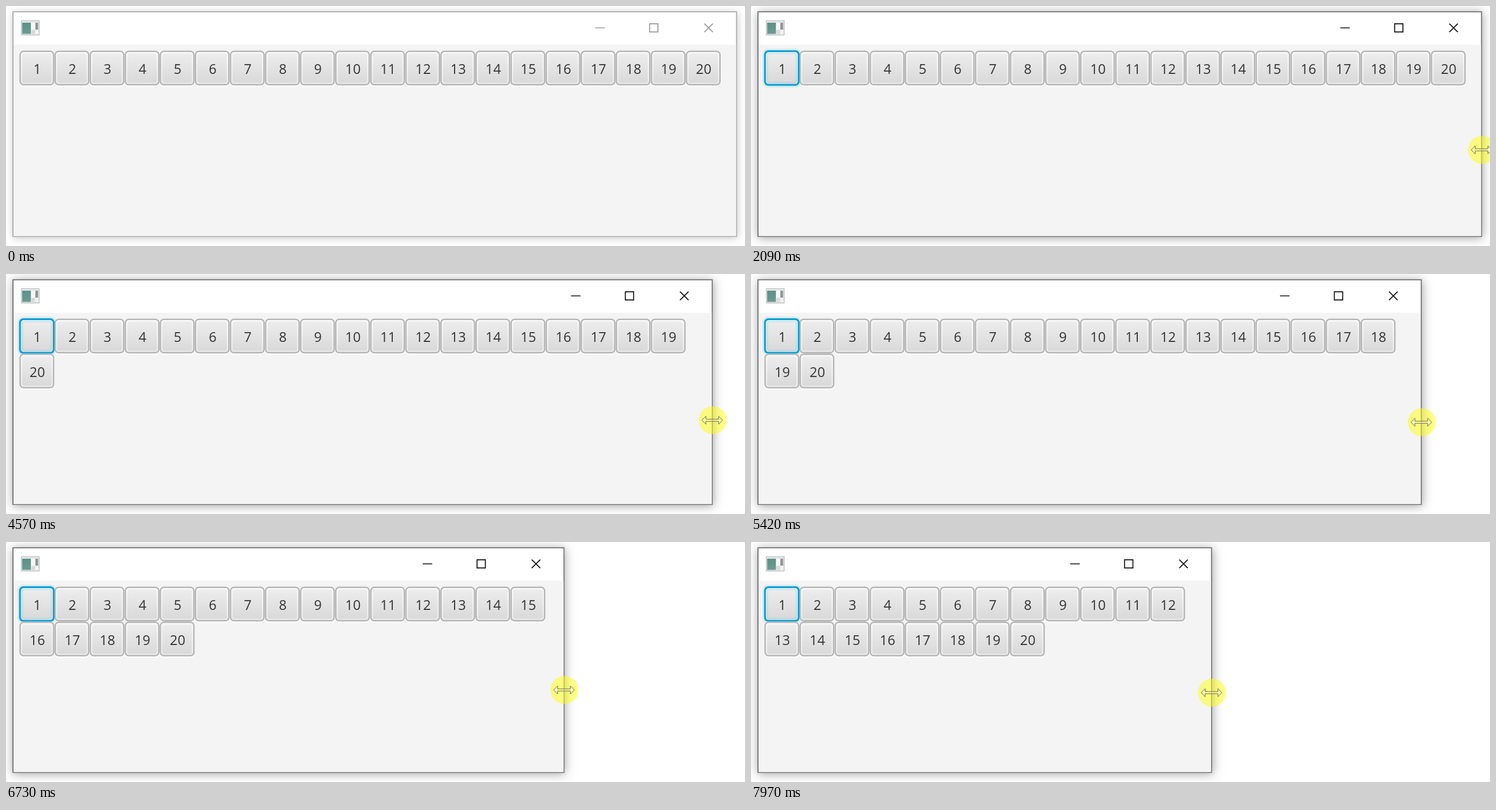
Animation of 1280x417 px, one loop 8 s. Source, as an HTML page with a canvas:

```html
<!DOCTYPE html>
<html lang="en">
<head>
<meta charset="utf-8">
<title>Wrapping buttons</title>
<style>
html, body { margin: 0; width: 100%; height: 100%; overflow: hidden; background: #fff; }
canvas { display: block; }
</style>
</head>
<body>
<canvas id="stage" width="1280" height="417"></canvas>
<script>
const ctx = document.getElementById('stage').getContext('2d');
const LOOP = 8000;
const POINTER_AT = 1070, ACTIVE_AT = 2090;
const REFRESH = 77;
const WIDEST = 1265.4;
const UNIT = 2.43; // screen pixels per layout pixel
const PITCH = 25 * UNIT;
const LEFT = 23.2, TOP = 77.6;

// Each pull of the window's right edge
const drags = [
  { start: 3410, end: 3490, edge: 1257 },
  { start: 3870, end: 4260, edge: 1237 },
  { start: 4460, end: 4570, edge: 1223.3 },
  { start: 4650, end: 5420, edge: 1161 },
  { start: 5500, end: 5810, edge: 1068 },
  { start: 6040, end: 6190, edge: 1047.6 },
  { start: 6270, end: 6730, edge: 966.5 },
  { start: 6810, end: 7420, edge: 858 },
  { start: 7820, end: 7970, edge: 797.7 }
];

// Share of a move done by now, in equal steps; the first step falls on start
function stepped(time, start, end) {
  if (time < start) return 0;
  const gaps = Math.round((end - start) / REFRESH);
  const passed = Math.floor((time - start) / (end - start) * gaps + 1e-6);
  return Math.min(1, (passed + 1) / (gaps + 1));
}

function edgeAt(time) {
  return drags.reduce((edge, d) => edge + (d.edge - edge) * stepped(time, d.start, d.end), WIDEST);
}

function pointerAt(time, edge) {
  if (time < ACTIVE_AT) return [1288 - 17 * stepped(time, 1620, 1860), 258];
  const pulled = WIDEST - edge;
  const drift = 9 * (1 - Math.exp(-pulled / 70));
  const sway = 0.006 * pulled * Math.cos((pulled - 298) / 54);
  return [edge + 0.8, 250 + drift - sway];
}

function rounded(x, y, w, h, r, fill) {
  ctx.beginPath();
  ctx.roundRect(x, y, w, h, r);
  ctx.fillStyle = fill;
  ctx.fill();
}

function rect(x, y, w, h, fill) {
  ctx.fillStyle = fill;
  ctx.fillRect(x, y, w, h);
}

function shade(y, h, from, to) {
  const g = ctx.createLinearGradient(0, y, 0, y + h);
  g.addColorStop(0, from);
  g.addColorStop(1, to);
  return g;
}

function drawFrame(edge, active) {
  ctx.save();
  ctx.shadowColor = active ? 'rgba(0,0,0,.36)' : 'rgba(0,0,0,.24)';
  ctx.shadowBlur = active ? 16 : 13;
  ctx.shadowOffsetX = 1;
  ctx.shadowOffsetY = 2;
  rect(11.2, 9.2, edge - 10.4, 392, active ? '#6e6e6e' : '#a8a8a8');
  ctx.restore();
  rect(13, 10.9, edge - 13.9, 388.7, '#fff');
  rect(13, 67.5, edge - 13.9, 332.1, '#f4f4f4');
}

function drawIcon() {
  rect(26, 25, 32, 26, '#b0b4b4');
  rect(27, 26, 30, 24, '#e6e8e8');
  rect(28, 29, 15, 19.5, shade(29, 19, '#5b9189', '#6a9b92'));
  rect(44, 29, 6, 12, '#f6f6f6');
  rect(44, 42, 6, 6.5, '#d8dada');
  rect(51, 29, 4.5, 12, '#8d9494');
  rect(51, 42, 5, 6.5, '#f2f2f2');
}

function drawTitleButtons(edge, active) {
  const min = edge - 236.5, max = edge - 143.4, close = edge - 48.5, y = 38;
  ctx.strokeStyle = active ? '#111' : '#999';
  ctx.lineWidth = 1.7;
  ctx.beginPath();
  ctx.moveTo(min - 8.2, y);
  ctx.lineTo(min + 8.2, y);
  ctx.rect(max - 7.2, y - 7.2, 14.4, 14.4);
  for (const side of [-1, 1]) {
    ctx.moveTo(close - 7.4 * side, y - 7.4);
    ctx.lineTo(close + 7.4 * side, y + 7.4);
  }
  ctx.stroke();
}

function drawButton(label, x, y, focused) {
  const size = PITCH - 0.3;
  const layer = (inset, radius, fill) => {
    const i = inset * UNIT, span = size - 2 * i;
    rounded(x + i, y + i, span, span, radius * UNIT, fill);
  };
  const body = shade(y + 4, size - 8, '#ededed', '#d9d9d9');
  if (!focused) rounded(x, y, size, size + UNIT, 3 * UNIT, '#fcfcfc');
  layer(focused ? -0.2 : 0, 3, focused ? '#039ed3' : '#b5b5b5');
  layer(1, 2, shade(y, size, '#fbfbfb', '#e9e9e9'));
  layer(2, 1, body);
  if (focused) {
    layer(-1.4, 4, 'rgba(3,158,211,.133)');
    layer(2.6, 1, body);
  }
  ctx.fillStyle = '#333';
  ctx.fillText(label, x + 31, y + 40.2);
}

function drawButtons(edge, active) {
  const columns = Math.floor((edge - 11 - LEFT) / PITCH);
  ctx.font = '23.4px "Open Sans", "Noto Sans", sans-serif';
  ctx.textAlign = 'center';
  for (let i = 0; i < 20; i++) {
    const x = LEFT + (i % columns) * PITCH;
    const y = TOP + Math.floor(i / columns) * PITCH;
    drawButton(i + 1, x, y, active && i === 0);
  }
}

function drawPointer(x, y) {
  ctx.beginPath();
  ctx.arc(x, y, 24.3, 0, Math.PI * 2);
  ctx.fillStyle = 'rgba(255,253,0,.48)';
  ctx.fill();

  ctx.save();
  ctx.translate(x - 0.8, y);
  ctx.beginPath();
  for (const side of [1, -1]) {
    ctx.lineTo(-18 * side, 0);
    ctx.lineTo(-11 * side, -7 * side);
    ctx.lineTo(-11 * side, -1.8 * side);
    ctx.lineTo(11 * side, -1.8 * side);
    ctx.lineTo(11 * side, -7 * side);
  }
  ctx.closePath();
  ctx.fillStyle = 'rgba(255,255,255,.4)';
  ctx.fill();
  ctx.strokeStyle = '#6c6a34';
  ctx.lineWidth = 1;
  ctx.stroke();
  ctx.restore();
}

function draw(time) {
  const edge = edgeAt(time);
  const active = time >= ACTIVE_AT;
  rect(0, 0, 1280, 417, '#fff');
  drawFrame(edge, active);
  drawIcon();
  drawTitleButtons(edge, active);
  drawButtons(edge, active);
  if (time >= POINTER_AT) drawPointer(...pointerAt(time, edge));
}

const began = performance.now();
function tick() {
  draw((performance.now() - began) % LOOP);
  requestAnimationFrame(tick);
}
tick();
</script>
</body>
</html>
```
